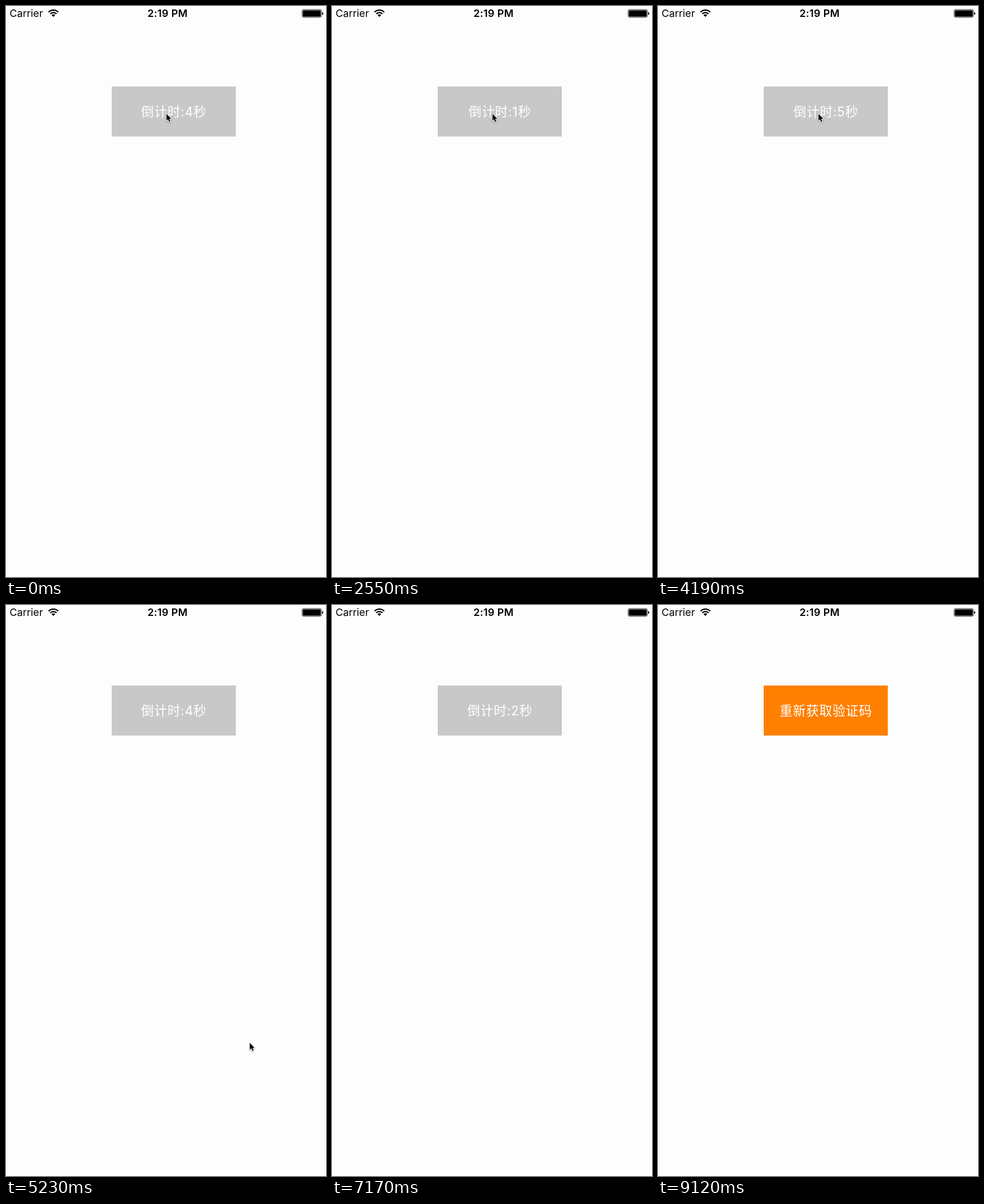
Write an HTML page that moves like this. It is 557 px wide and 993 px high and loops after 9.43 s.

```html
<!DOCTYPE html>
<html lang="zh">
<head>
<meta charset="utf-8">
<title>Countdown button</title>
<style>
html, body { margin: 0; width: 100%; height: 100%; overflow: hidden; background: #fdfdfd; }
svg { display: block; width: 100vw; height: 100vh; }
text { font-family: Inter, "Noto Sans CJK SC", "Noto Sans CJK", sans-serif; }
.status { font-size: 17.8px; }
#clock { font-weight: 600; letter-spacing: .3px; text-anchor: middle; }
#label { font-size: 22.3px; letter-spacing: .7px; font-weight: 300; fill: #fff; text-anchor: middle; }
#digit { font-weight: 400; }
#pointer { filter: drop-shadow(0 1px 1px rgba(0, 0, 0, .35)); }
</style>
</head>
<body>
<svg viewBox="0 0 557 993">
  <rect width="557" height="993" fill="#fdfdfd"/>
  <text class="status" x="6.2" y="19">Carrier</text>
  <g transform="translate(82.5 19)" fill="none" stroke="#000" stroke-width="2.3">
    <path d="M-8.4 -8.4A11.9 11.9 0 0 1 8.4 -8.4"/>
    <path d="M-5.4 -5.4A7.6 7.6 0 0 1 5.4 -5.4"/>
    <path d="M0 0L-3.2 -3.2A4.5 4.5 0 0 1 3.2 -3.2Z" fill="#000" stroke="none"/>
  </g>
  <text class="status" id="clock" x="281.2" y="19">2:19 PM</text>
  <rect x="515.4" y="6.2" width="33.6" height="13.4" rx="2.6" fill="none" stroke="#000" stroke-width=".8"/>
  <rect x="516.6" y="7.4" width="31.2" height="11" rx="1.5"/>
  <path d="M550.2 10.4q2.2 .6 2.2 2.5t-2.2 2.5z"/>
  <rect id="button" x="184" y="140" width="216" height="87"/>
  <text id="label" x="292.2" y="192"><tspan id="before"></tspan><tspan id="digit"></tspan><tspan id="after"></tspan></text>
  <path id="pointer" d="M0 0V11.8L2.6 9.4L4.6 14L6.6 13.2L4.6 8.6H8.3Z"
        stroke="#fff" stroke-width="2" stroke-linejoin="round" paint-order="stroke"/>
</svg>
<script>
const LOOP = 9430, STEP = 149.25;   // the screen refreshes once per step
const PRESSES = [-1570, 4095];      // when the button is tapped, in ms
const LEAVE = 31;                   // step at which the pointer leaves the button
const REST = [279.4, 187.6];
// pointer tip at each step of the hand's way out
const TRAIL = [
  [399.4, 469.6], [417.4, 770.6], [417.4, 770.6], [423.4, 760.6], [424.4, 761.6],
  [452.4, 812.6], [461.4, 856.6], [458.4, 857.6], [460.4, 850.6], [536.4, 981.6]
];
const HIDDEN = [-50, -50];
const $ = id => document.getElementById(id);

function secondsLeft(now) {
  const press = PRESSES.findLast(p => p <= now);
  return Math.max(0, 5 - Math.floor((now - press) / 1000));
}

function setLabel(before, digit, after) {
  $('before').textContent = before;
  $('digit').textContent = digit;
  $('after').textContent = after;
}

function draw(step) {
  const left = secondsLeft(step * 150);
  if (left) setLabel('倒计时', ':' + left, '秒');
  else setLabel('重新获取验证码', '', '');
  $('button').setAttribute('fill', left ? '#c8c8c8' : '#ff8000');
  const [x, y] = step < LEAVE ? REST : TRAIL[step - LEAVE] || HIDDEN;
  $('pointer').setAttribute('transform', `translate(${x} ${y})`);
}

const start = performance.now();
let shown = -1;
function tick() {
  const step = Math.floor((performance.now() - start) % LOOP / STEP);
  if (step !== shown) draw(shown = step);
  requestAnimationFrame(tick);
}
tick();
</script>
</body>
</html>
```
